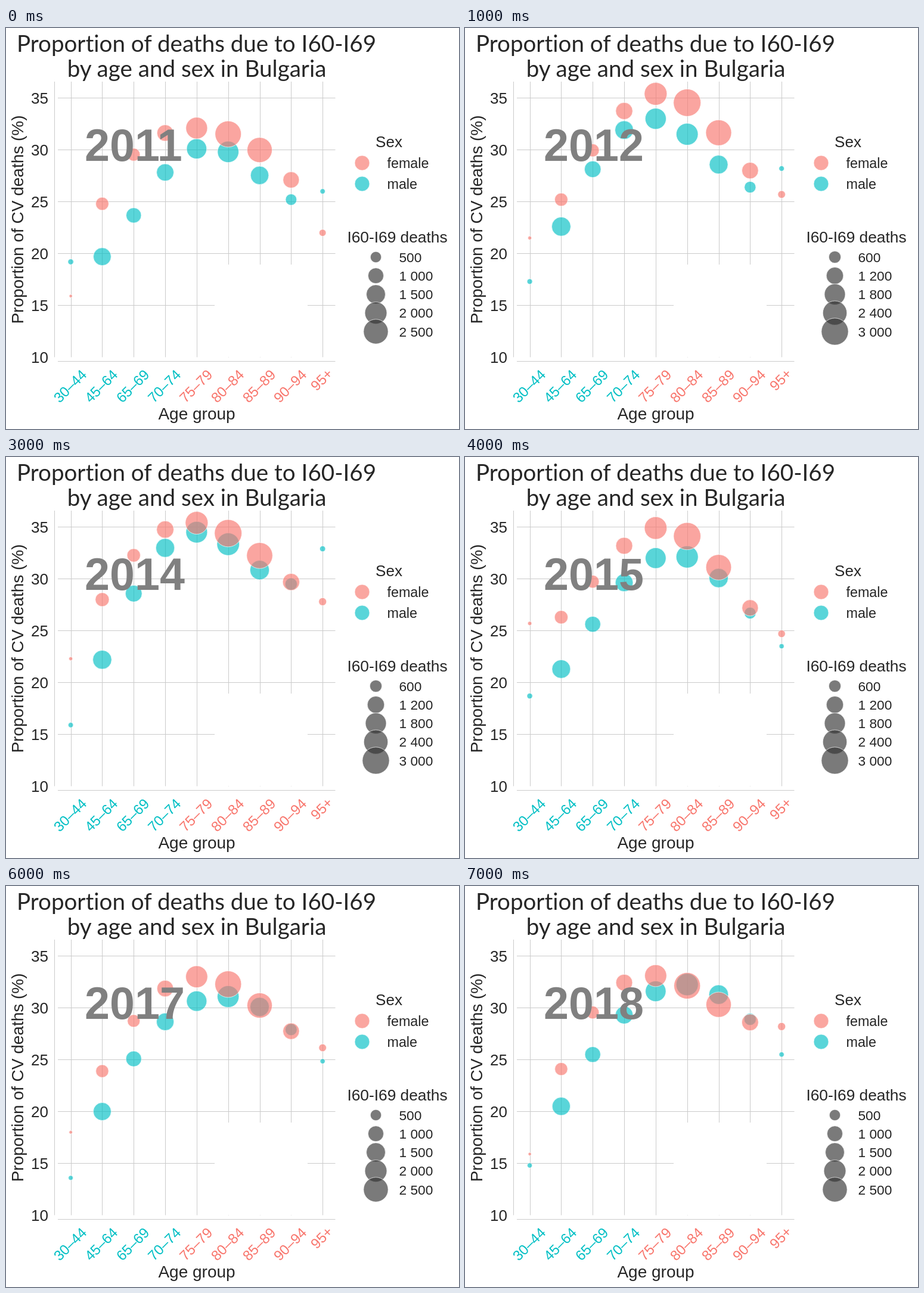
These frames come from a looping animation (760x673 px, 8 s). An HTML page:

```html
<!DOCTYPE html>
<html lang="en">
<head>
<meta charset="utf-8">
<title>Proportion of deaths by age and sex</title>
<style>
  html, body { margin: 0; width: 100%; height: 100%; overflow: hidden; background: #fff; }
  svg { display: block; font-family: "Liberation Sans", Arial, sans-serif; fill: #262626; }
  .title { font: 38.6px Lato, sans-serif; font-variant-ligatures: none; }
  .year { font-size: 75.5px; font-weight: bold; fill: #808080; }
  .grid { stroke: #cbcbcb; fill: none; }
  circle { fill-opacity: .65; stroke: #fff; stroke-opacity: .65; }
</style>
</head>
<body>
<svg width="760" height="673" viewBox="0 0 760 673">
  <clipPath id="plot"><rect x="81" y="90" width="471" height="470"/></clipPath>
  <g id="axes"></g>
  <g id="bubbles" clip-path="url(#plot)"></g>
  <text id="year" class="year" x="132" y="222.5"></text>
  <g id="legend"></g>
</svg>
<script>
const FEMALE = '#f8766d', MALE = '#00bfc4';
const ages = ['30–44', '45–64', '65–69', '70–74', '75–79', '80–84', '85–89', '90–94', '95+'];
const $ = id => document.getElementById(id);
const ageX = i => 108.6 + 52.82 * i;
const rateY = rate => 552.5 - (rate - 10) * 17.4;

// Each year's curve runs through its rates (%) at five key age groups;
// radii are the bubble sizes at a rate of 30 %
const keyAges = [0, 1, 4, 7, 8];
const series = [
  { color: MALE,
    radii: [5.9, 18.4, 14.3, 15, 16.8, 17.9, 16, 10.3, 4.6],
    rates: {
      2011: [19.2, 19.7, 30.1, 25.2, 26],
      2012: [17.3, 22.6, 33, 26.4, 28.2],
      2014: [15.9, 22.2, 34.5, 29.5, 32.9],
      2015: [18.7, 21.3, 32, 26.7, 23.5],
      2016: [12.4, 19.5, 29.7, 26.9, 24.2],
      2018: [14.8, 20.5, 31.6, 28.9, 25.5]
    } },
  { color: FEMALE,
    radii: [3.6, 12, 10.8, 13.4, 17.5, 21.4, 21, 14.3, 6.8],
    rates: {
      2011: [15.9, 24.8, 32.1, 27.1, 22],
      2012: [21.5, 25.2, 35.4, 28, 25.7],
      2014: [22.3, 28, 35.4, 29.7, 27.8],
      2015: [25.7, 26.3, 34.9, 27.2, 24.7],
      2016: [20.1, 23.7, 32.9, 26.9, 24.1],
      2018: [15.9, 24.1, 33.1, 28.6, 28.2]
    } }
];

const text = (x, y, size, str, attrs = '') =>
  `<text x="${x}" y="${y}" font-size="${size}" ${attrs}>${str}</text>`;
const middle = 'text-anchor="middle"';
const circle = (x, y, r, color) => `<circle cx="${x}" cy="${y}" r="${r}" fill="${color}"/>`;

// Years without a row lie midway between their neighbours
const keyRates = (rates, year) => rates[year] ||
  rates[year - 1].map((rate, k) => (rate + rates[year + 1][k]) / 2);

// Lagrange polynomial through the key points
const curve = (values, age) => values.reduce((sum, value, k) =>
  sum + keyAges.reduce((term, other, j) =>
    j === k ? term : term * (age - other) / (keyAges[k] - other), value), 0);

function drawBubbles(year) {
  $('bubbles').innerHTML = series.map(({ color, radii, rates }) => {
    const keys = keyRates(rates, year);
    return radii.map((radius, i) => {
      const rate = curve(keys, i);
      return circle(ageX(i), rateY(rate), radius * Math.sqrt(rate / 30), color);
    }).join('');
  }).join('');
}

function drawAxes() {
  let grid = 'M81.5 90V552.5M87 559.5H552.5', labels = '';
  for (let rate = 10; rate <= 35; rate += 5) {
    if (rate > 10) grid += `M87 ${rateY(rate)}H552.5`;
    labels += text(71, rateY(rate) + 9, 26, rate, 'text-anchor="end"');
  }
  ages.forEach((age, i) => {
    const x = Math.round(ageX(i)) + .5, y = age.length < 5 ? 590 : 601;
    grid += `M${x} 90V552.5`;
    labels += text(0, 8.3, 23.8, age, `${middle} fill="${i < 4 ? MALE : FEMALE}"
      transform="translate(${x - 2} ${y}) rotate(-45)"`);
  });
  $('axes').innerHTML = `<path class="grid" d="${grid}"/>
    <rect x="350" y="397" width="156" height="155" fill="#fff"/>` + labels +
    `<text class="title" x="319.5" y="40" ${middle}>Proportion of deaths due to I60-I69</text>
    <text class="title" x="320" y="82" ${middle}>by age and sex in Bulgaria</text>` +
    text(320, 657, 28, 'Age group', middle) +
    text(0, 0, 28, 'Proportion of CV deaths (%)', middle + ' transform="translate(29 321.5) rotate(-90)"');
}

function drawLegend(year) {
  const step = [2012, 2014, 2015].includes(year) ? 600 : 500;
  let out = text(642.5, 200, 26, 'Sex', middle) +
    circle(597.5, 226.5, 12.5, FEMALE) + text(639.5, 235, 23.3, 'female') +
    circle(597.5, 261.5, 12.5, MALE) + text(639.5, 270, 23.3, 'male') +
    text(656.5, 360, 26.3, 'I60-I69 deaths', middle);
  for (let i = 0; i < 5; i++) {
    const deaths = step * (i + 1), y = 384.5 + 31.25 * i;
    const label = String(deaths).replace(/(\d)(\d{3})$/, '$1 $2');
    out += circle(620.5, y, .413 * Math.sqrt(deaths), '#333') + text(659.5, y + 8, 22.7, label);
  }
  $('legend').innerHTML = out;
}

let shown;
function frame(now) {
  const year = 2011 + Math.floor(now / 1000) % 8;
  if (year !== shown) {
    shown = year;
    $('year').textContent = year;
    drawBubbles(year);
    drawLegend(year);
  }
  requestAnimationFrame(frame);
}

drawAxes();
frame(performance.now());
</script>
</body>
</html>
```
